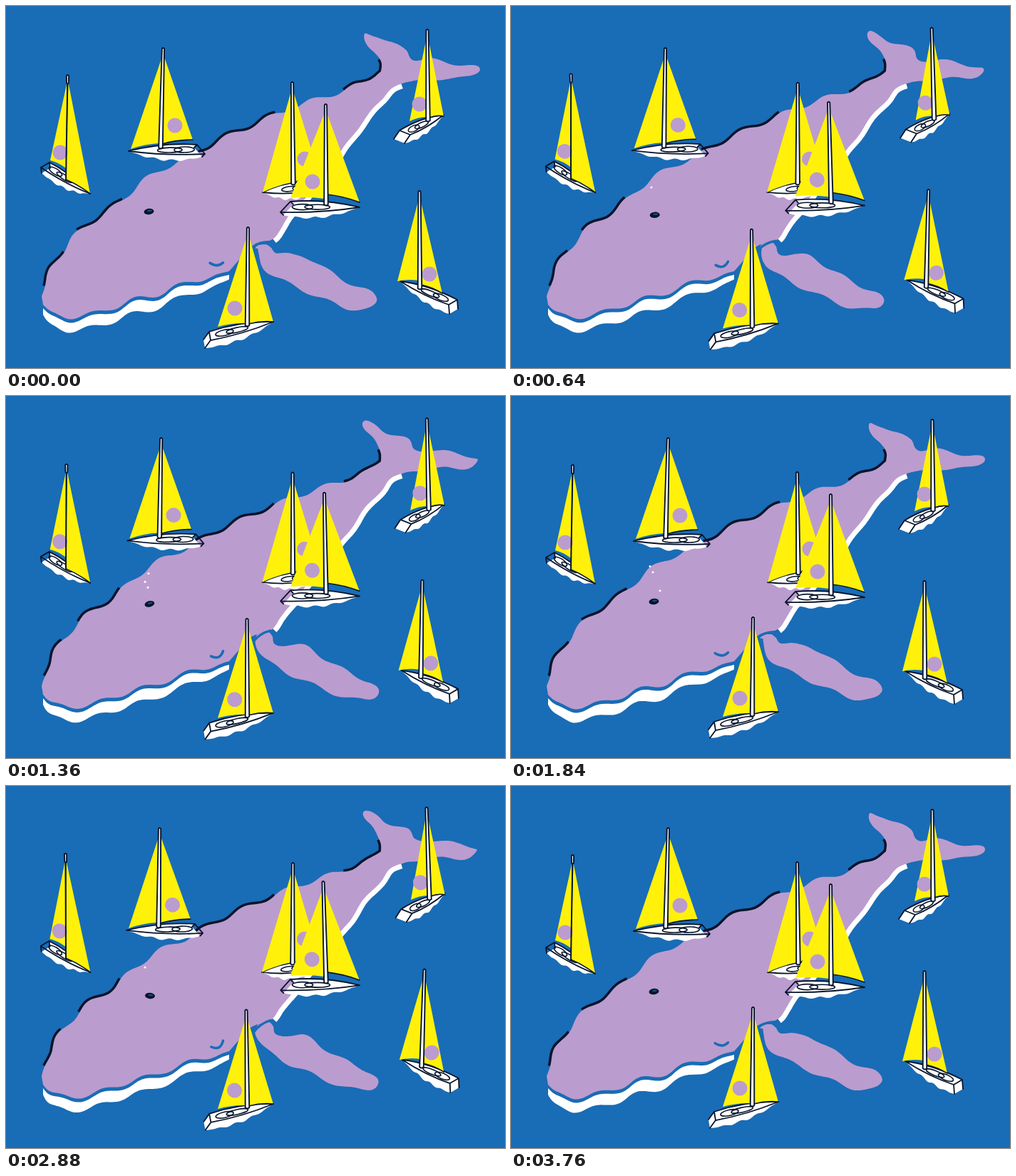
An HTML page that plays this animation: 700 px wide and 509 px high, repeating every 3.84 s.

```html
<!DOCTYPE html>
<html lang="en">
<head>
<meta charset="utf-8">
<title>Whale and sailboats</title>
<style>
html, body { margin: 0; width: 100%; height: 100%; overflow: hidden; background: #196cb6; }
svg { display: block; width: 100vw; height: 100vh; }
.ink { fill: none; stroke: #07142b; stroke-linecap: round; stroke-linejoin: round; }
</style>
</head>
<body>
<svg id="stage" viewBox="0 0 700 509"></svg>
<script>
const LOOP = 3840, SWAY = 1920, STEP = 80, RIPPLE = 64;
const LILAC = '#bb9cce', YELLOW = '#fff10a', SEA = '#196cb6', INK = '#07142b';
const stage = document.getElementById('stage');

function add(tag, attrs, parent = stage) {
  const node = document.createElementNS('http://www.w3.org/2000/svg', tag);
  for (const key in attrs) node.setAttribute(key, attrs[key]);
  parent.appendChild(node);
  return node;
}

const mix = (a, b, k) => a + (b - a) * k;
const mixPt = (p, q, k) => [mix(p[0], q[0], k), mix(p[1], q[1], k)];
const shift = ([x, y], dx, dy) => [x + dx, y + dy];
const line = pts => 'M' + pts.map(p => p.map(v => v.toFixed(1))).join('L');

// Samples a Catmull-Rom curve through the key points: [x, y, distance, normal x, normal y].
function trace(text, closed = false, per = 10) {
  const keys = text.split(' ').map(p => p.split(',').map(Number)), n = keys.length;
  const key = i => keys[closed ? (i + n) % n : Math.max(0, Math.min(n - 1, i))];
  const out = [];
  let s = 0;
  for (let i = 0; i <= (closed ? n : n - 1) * per; i++) {
    const j = Math.floor(i / per), u = i / per - j;
    const [a, b, c, d] = [-1, 0, 1, 2].map(o => key(j + o));
    const p = [0, 1].map(q => b[q] + u / 2 * (c[q] - a[q]
      + u * (2 * a[q] - 5 * b[q] + 4 * c[q] - d[q] + u * (3 * (b[q] - c[q]) + d[q] - a[q]))));
    if (out.length) s += Math.hypot(p[0] - out[i - 1][0], p[1] - out[i - 1][1]);
    out.push([...p, s]);
  }
  return out.map(([x, y, s], i) => {
    const a = out[Math.max(0, i - 1)], b = out[Math.min(out.length - 1, i + 1)];
    const len = Math.hypot(b[0] - a[0], b[1] - a[1]) || 1;
    return [x, y, s, (b[1] - a[1]) / len, (a[0] - b[0]) / len];
  });
}

// Ripples an edge; crest and travel are distances along it.
function ripple({ pts, amp, crest, travel, open = true }, k) {
  const total = pts[pts.length - 1][2];
  return pts.map(([x, y, s, nx, ny]) => {
    const fade = open ? Math.min(1, s / 40, (total - s) / 40) : 1;
    const h = amp * fade * Math.cos(2 * Math.PI * (s - crest - travel * k) / RIPPLE);
    return [x + nx * h, y + ny * h];
  });
}

const back = { amp: 3.5, crest: 35, travel: 27, pts: trace(
  '50,408 60,378 80,343 110,311 150,284 185,252 220,229 262,210 300,189 345,168 390,148 430,133 470,120 505,106 526,92') };
const tail = { amp: 2.5, crest: 40, travel: 30, pts: trace(
  '526,92 526,80 518,66 504,47 504,37 520,42 535,51 562,61 573,75 600,76 630,81 661,87 656,96 638,102 604,102 578,105 562,107') };
const flank = { amp: 1.2, crest: 30, travel: 20, pts: trace(
  '562,107 540,116 525,134 500,163 478,194 440,245 405,286 386,312 372,328 346,338 326,358') };
const lip = { amp: 3.5, crest: 41, travel: -16, pts: trace(
  '313,373 290,380 262,387 235,396 208,407 180,413 150,424 120,433 90,437 64,431 52,420') };
const fin = { amp: 2.5, crest: 52, travel: 32, open: false, pts: trace(
  '351,341 364,333 373,338 379,348 400,350 422,353 450,371 485,391 512,403 521,415 510,426 480,425 452,415 420,401 390,387 362,368', true) };

const bellyEl = add('path', { fill: 'none', stroke: '#fff', 'stroke-width': 14, 'stroke-linejoin': 'round' });
const shadeEl = add('path', { fill: 'none', stroke: INK, 'stroke-width': 7,
  'stroke-dasharray': '0 15 57 36 78 130 124 105 78 900' });
const finEl = add('path', { fill: LILAC });
const bodyEl = add('path', { fill: LILAC });
const foldEl = add('path', { fill: 'none', stroke: SEA, 'stroke-width': 3.5 });
const jawEl = add('path', { fill: '#fff' });
const smileEl = add('path', { fill: 'none', stroke: SEA, 'stroke-width': 3.5, 'stroke-linecap': 'round' });
const eye = add('g', {});
add('ellipse', { rx: 7, ry: 4.2, fill: INK }, eye);
add('ellipse', { cx: 1, cy: -1, rx: 3.5, ry: 1.3, fill: '#174b82' }, eye);

// Droplets: time of birth and x.
const LIFE = 1180;
const drops = [[60, 197], [660, 200], [920, 195], [1100, 199], [1680, 209], [2300, 195]]
  .map(([birth, x]) => ({ birth, el: add('circle', { cx: x, fill: '#fff' }) }));

// left, right: outer sail corners; hem: sail height at the mast on each side.
// bow, far, near: deck corners; drop: from deck to waterline at the stern.
// lean moves the masthead, drift moves the foot.
const fleet = [
  { top: [86.5, 98], foot: [84, 245], left: [62, 217], right: [118, 264], hem: [228, 244], bow: [118, 264],
    far: [61, 220], near: [49, 227], drop: [1, 8], badge: [76, 206], lean: [-3, -2], drift: [0, -2], thin: true },
  { top: [220.5, 60], foot: [217, 199], left: [175, 201], right: [262, 188], hem: [193, 194], bow: [172, 204],
    far: [268, 195], near: [279, 208], drop: [-4, 4], badge: [237, 168], lean: [-5, 0], drift: [-3, -1] },
  { top: [401.5, 108], foot: [403, 250], left: [360, 262], right: [437, 230], hem: [248, 249], bow: [360, 262],
    far: [424, 247], near: [430, 260], drop: [-3, 5], badge: [419, 215], lean: [1, 1], drift: [-1, 0] },
  { top: [448.5, 139], foot: [449, 279], left: [399, 270], right: [496, 276], hem: [271, 265], bow: [496, 283],
    far: [399, 275], near: [385, 290], drop: [4, 4], badge: [430, 247], lean: [-3.5, -4], drift: [0, -3] },
  { top: [591, 34], foot: [592, 161], left: [566, 162], right: [614, 155], hem: [156, 157], bow: [614, 153],
    far: [552, 175], near: [567, 181], drop: [-8, 12], badge: [580, 138], lean: [-1, -3], drift: [2, -2] },
  { top: [339.5, 312], foot: [338.5, 449], left: [297, 451], right: [375, 444], hem: [446, 447], bow: [375, 444],
    far: [285, 458], near: [287, 470], drop: [-8, 11], badge: [321, 425], lean: [-2.5, 3.5], drift: [0, 3] },
  { top: [580, 261], foot: [580.5, 397], left: [549, 387], right: [612, 404], hem: [386, 392], bow: [553, 387],
    far: [633, 413], near: [621, 420], drop: [1, 13], badge: [594, 377], lean: [7, -2.5], drift: [2.5, -2] }
];

function buildHull(b) {
  const { bow, far, near, drop } = b;
  const farMid = shift(mixPt(bow, far, 0.5), 0, -8), nearMid = shift(mixPt(bow, near, 0.5), 0, 5);
  const farLow = shift(far, ...drop), nearLow = shift(near, ...drop), keel = shift(nearMid, 0, 14);
  const foam = [];
  for (let i = 0; i <= 30; i++) {
    const u = i / 30, p = mixPt(mixPt(nearLow, keel, u), mixPt(keel, bow, u), u);
    foam.push(shift(p, 0, 1.6 * Math.sin(u * 26) * Math.sin(Math.PI * u)));
  }
  const rim = `M${far}Q${farMid} ${bow}Q${nearMid} ${near}Z`;
  add('path', { d: `M${bow}Q${farMid} ${far}L${farLow}${line(foam).replace('M', 'L')}Z`, fill: '#fff' }, b.el);
  add('path', { d: `${rim}M${far}L${farLow}M${near}L${nearLow}`, class: 'ink', 'stroke-width': 1.8 }, b.el);

  const stern = mixPt(far, near, 0.5), dx = bow[0] - stern[0], dy = bow[1] - stern[1];
  const len = Math.hypot(dx, dy), turn = Math.atan2(dy, dx) * 180 / Math.PI;
  for (const [u, rx, ry] of [[0.23, 0.14, 4], [0.43, 0.17, 3.4]]) {
    const c = mixPt(stern, bow, u);
    add('ellipse', { rx: len * rx, ry, class: 'ink', 'stroke-width': 1.6,
      transform: `translate(${c}) rotate(${turn})` }, b.el);
  }
}

function buildSails(b) {
  const { top: [x, y], foot: [fx, fy] } = b;
  for (const [side, corner, hem] of [[-1, b.left, b.hem[0]], [1, b.right, b.hem[1]]]) {
    const inner = [fx + side * (b.thin ? 0 : 2), hem];
    const curve = `${corner}Q${shift(mixPt(corner, inner, 0.5), 0, -3)} ${inner}`;
    add('path', { d: `M${x + side} ${y + 10}L${curve}Z`, fill: YELLOW }, b.el);
    if (side > 0) add('path', { d: 'M' + curve, class: 'ink', 'stroke-width': 1.6 }, b.el);
  }
  add('circle', { cx: b.badge[0], cy: b.badge[1], r: 10.5, fill: LILAC }, b.el);
  if (b.thin) add('path', { d: `M${b.top}L${b.foot}`, class: 'ink', 'stroke-width': 2 }, b.el);
  const [ex, ey, w] = b.thin ? [x, y + 10, 1.4] : [fx, fy, 2.8];
  add('path', { d: `M${x - 1.6} ${y}Q${x} ${y - 2} ${x + 1.6} ${y}L${ex + w} ${ey}Q${ex} ${ey + 3} ${ex - w} ${ey}Z`,
    fill: '#fff', stroke: INK, 'stroke-width': 1.9 }, b.el);
}

for (const b of fleet) {
  b.el = add('g', {});
  buildHull(b);
  buildSails(b);
}

function rock(b, k) {
  const foot = b.foot[1], h = foot - b.top[1];
  const [dx, dy] = b.drift.map(v => v * k);
  const sx = (b.lean[0] * k - dx) / h, sy = (b.lean[1] * k - dy) / h;
  b.el.setAttribute('transform', `matrix(1 0 ${-sx} ${1 - sy} ${dx + sx * foot} ${dy + sy * foot})`);
}

function drawWhale(k) {
  const spine = ripple(back, k), fluke = ripple(tail, k), side = ripple(flank, k), mouth = ripple(lip, k);
  const chin = mouth.map((p, i) => {
    const u = i / (mouth.length - 1);
    return shift(p, -5 * Math.sin(Math.PI * u), 7 + 14 * Math.sqrt(Math.sin(Math.PI * mix(0.03, 0.92, u))));
  });
  bodyEl.setAttribute('d', line([...spine, ...fluke, ...side, ...mouth]) + 'Z');
  bellyEl.setAttribute('d', line(side.slice(4, 80)));
  shadeEl.setAttribute('d', line([...spine, ...fluke.slice(0, 22)]));
  finEl.setAttribute('d', line(ripple(fin, k)) + 'Z');
  jawEl.setAttribute('d', line([...mouth.map(p => shift(p, 0, 5)), ...chin.reverse()]) + 'Z');
  smileEl.setAttribute('d', `M${mix(286, 288, k)} ${mix(361, 367, k)}Q${mix(296, 301, k)} ${mix(368, 373, k)} 304.5 ${mix(361, 358, k)}`);
  foldEl.setAttribute('d', `M347 ${mix(338, 347, k)}Q356 ${mix(331, 334, k)} 372 ${mix(332, 329, k)}`);
}

const sway = (t, lag) => (1 - Math.cos(2 * Math.PI * (t - lag) / SWAY)) / 2;

function draw(time) {
  const t = Math.floor(time % LOOP / STEP) * STEP, k = sway(t, -STEP / 2);
  drawWhale(sway(t, STEP * 1.5));

  const tilt = -7 + 12 * k - 14 * Math.sin(Math.PI * k);
  eye.setAttribute('transform', `translate(${mix(200.5, 202, k)} ${mix(289, 295, k)}) rotate(${tilt})`);

  for (const { birth, el } of drops) {
    const age = t - birth;
    el.setAttribute('cy', 281 - 0.045 * age);
    el.setAttribute('r', age >= 0 && age < LIFE ? 1.5 : 0);
  }
  for (const b of fleet) rock(b, k);
}

const begin = performance.now();
function tick() {
  draw(performance.now() - begin);
  requestAnimationFrame(tick);
}
tick();
</script>
</body>
</html>
```
